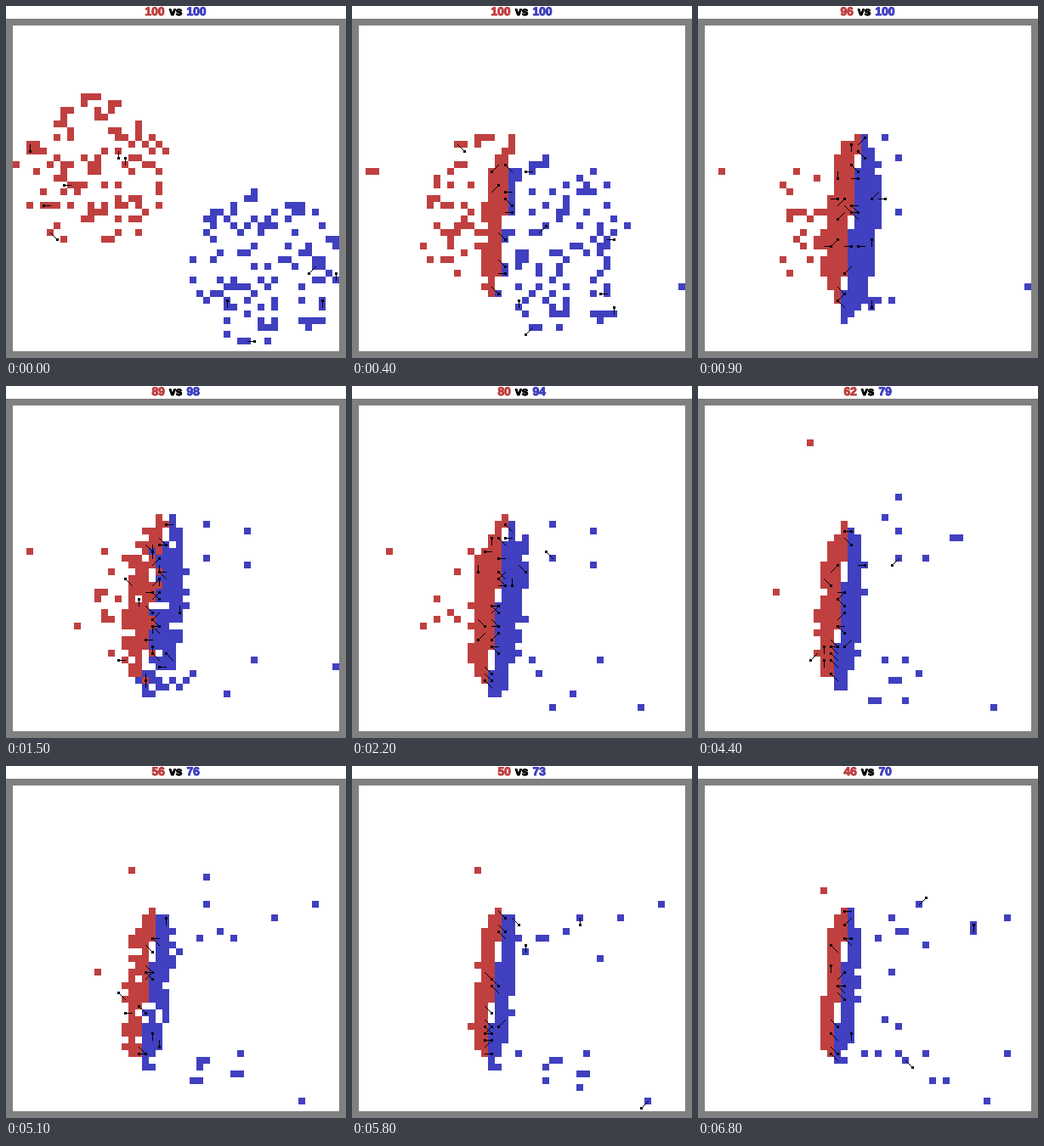
Animation, 400 px wide and 415 px high, one loop 6.9 s. Source, as a matplotlib script:

```python
import numpy as np
import matplotlib.pyplot as plt
from matplotlib import patheffects
from matplotlib.animation import FuncAnimation

W, H, DPI = 400, 415, 80
CELL, SIDE, LEFT, TOP = 8, 48, 8, 23
FRAMES, INTERVAL = 69, 100
RED, BLUE = (192, 64, 64), (64, 64, 192)

TIMES = [0, 9, 22, 34, 44, 58, 68]
SIZES = [(100, 96, 80, 69, 62, 50, 46), (100, 100, 94, 86, 79, 73, 70)]
CAMPS = [(11.6, 21), (36.5, 35.3)]
# One wanderer per team, given as a few waypoints
LONERS = [[(0, 20), (2, 21), (4, 21), (14, 8), (15, 5), (17, 12), (17, 15)],
          [(47, 37), (47, 38), (41, 44), (41, 45), (42, 44), (42, 46), (41, 46)]]

rng = np.random.default_rng(12)
GRID = [(c, r) for r in range(SIDE) for c in range(SIDE)]
NEAR = sorted(((dx, dy) for dx in range(-6, 7) for dy in range(-6, 7)),
              key=lambda d: d[0] ** 2 + d[1] ** 2)
DIRS = [(dx, dy) for dx in (-1, 0, 1) for dy in (-1, 0, 1) if dx or dy]


def inside(c, r):
    return 0 <= c < SIDE and 0 <= r < SIDE


def settle(wanted, taken):
    """Give each wanted cell, or the nearest free one."""
    cells = []
    for c, r in wanted:
        for dx, dy in NEAR:
            p = (int(c + dx), int(r + dy))
            if p not in taken and inside(*p):
                taken.add(p)
                cells.append(p)
                break
    return cells


def best(score, n, taken):
    """The n free cells with the lowest score."""
    ranked = sorted((score(c, r), (c, r)) for c, r in GRID if (c, r) not in taken)
    cells = [cell for _, cell in ranked[:n]]
    taken.update(cells)
    return cells


def camp_score(side):
    cx, cy = CAMPS[side]
    return lambda c, r: np.hypot(c - cx, r - cy) // 11.5 + rng.random()


def line_score(side, t):
    """Depth behind a slanted front, fading at both ends of the line."""
    mid, half = ((28, 12), (30, 12.5))[side]

    def score(c, r):
        edge = 20 - 0.11 * (r - 18) + 1.5 * np.exp((9 - t) / 10)
        depth = c - edge - 1.3 if side else edge - c
        if depth < -0.5:
            return 99
        return depth + 2.5 * ((r - mid) / half) ** 4 + rng.uniform(0, 1.2)
    return score


def strays(side, t):
    """Red latecomers thin out; blue flanks spread to the right."""
    if side == 0:
        n = round(22 * np.exp((9 - t) / 12))
        return np.rint(rng.normal((13.5, 28), (2.5, 4.5), (n, 2)))
    n = round(6 + 0.2 * t)
    cols = np.minimum(23 + rng.exponential(2 + 0.1 * t, n), SIDE - 4)
    rows = np.where(np.arange(n) % 2, rng.normal(20, 3, n), rng.normal(40, 2, n))
    return np.rint(np.column_stack([cols, rows]))


def formations():
    keys = []
    for k, t in enumerate(TIMES):
        taken, pair = set(), []
        for side in (0, 1):
            cells = settle([LONERS[side][k]], taken)
            if k:
                cells += settle(strays(side, t), taken)
            score = line_score(side, t) if k else camp_score(side)
            cells += best(score, SIZES[side][k] - len(cells), taken)
            pair.append(np.array(cells))
        keys.append(pair)
    return keys


def match(a, b):
    """Pair up two sets of cells by swapping until the travel is short."""
    cost = ((a[:, None] - b[None]) ** 2).sum(-1)
    rows = order = np.arange(len(a))
    order = order.copy()
    for _ in range(12):
        for i in rows:
            gain = (cost[i, order[i]] + cost[rows, order]
                    - cost[i, order] - cost[rows, order[i]])
            j = gain.argmax()
            if gain[j] > 0:
                order[i], order[j] = order[j], order[i]
    return order


def plan(a, b, steps, opening):
    """Wanted cells of one team for each step; None marks the fallen."""
    lost = len(a) - len(b)
    ends = np.vstack([b, b[rng.integers(0, len(b), lost)]])
    # The wanderer keeps its place in the list
    order = np.append(0, 1 + match(a[1:], ends[1:]))
    base = 0.5 if opening else 0
    walks = []
    for start, t in zip(a, order):
        move = ends[t] - start
        need = min(steps, max(1, int(np.ceil(np.abs(move).max() / 2))))
        wait = 0 if opening else rng.integers(0, steps - need + 1)
        end = steps + 1
        if t >= len(b):
            end = np.ceil(steps * (base + (1 - base) * (t - len(b) + 1) / lost))
        walks.append([np.rint(start + move * np.clip((s - wait) / need, 0, 1))
                      if s < end else None for s in range(steps + 1)])
    return walks


def battle():
    keys = formations()
    frames = [[[tuple(p) for p in team] for team in keys[0]]]
    for k in range(len(TIMES) - 1):
        steps = TIMES[k + 1] - TIMES[k]
        walks = [plan(keys[k][s], keys[k + 1][s], steps, k == 0) for s in (0, 1)]
        for s in range(1, steps + 1):
            taken = set()
            frames.append([settle([w[s] for w in team if w[s] is not None], taken)
                           for team in walks])
    return frames


def attacks(teams, i):
    """Strikes as (cell, direction), mostly at neighbouring enemies."""
    dice = np.random.default_rng(100 + i)
    hits = []
    for side in (0, 1):
        foes = set(teams[1 - side])
        for c, r in teams[side]:
            reach = [d for d in DIRS if inside(c + d[0], r + d[1])]
            aims = [d for d in reach if (c + d[0], r + d[1]) in foes]
            if dice.random() < (0.35 if aims else 0.08):
                pool = aims or reach
                hits.append(((c, r), pool[dice.integers(len(pool))]))
    return hits


def paint(i):
    img = np.full((H, W, 3), 255, np.uint8)
    img[TOP - CELL:] = 128
    img[TOP:TOP + SIDE * CELL, LEFT:LEFT + SIDE * CELL] = 255
    for team, color in zip(BATTLE[i], (RED, BLUE)):
        for c, r in team:
            y, x = TOP + r * CELL, LEFT + c * CELL
            img[y:y + CELL, x:x + CELL] = color
    for (c, r), (dx, dy) in attacks(BATTLE[i], i):
        x, y = LEFT + c * CELL + 4, TOP + r * CELL + 4
        for k in range(CELL + 1):
            img[y + k * dy, x + k * dx] = 0
        x, y = x + CELL * dx, y + CELL * dy
        img[y - 1:y + 2, x - 1:x + 2] = 0
    return img


BATTLE = battle()
fig = plt.figure(figsize=(W / DPI, H / DPI), dpi=DPI)
ax = fig.add_axes([0, 0, 1, 1])
ax.axis("off")
field = ax.imshow(paint(0), extent=(0, W, H, 0), aspect="auto", interpolation="nearest")


def label(color):
    rgb = np.array(color) / 255
    return ax.text(0, 11, "", color=rgb, family="Liberation Sans", weight="bold",
                   size=12.4, va="baseline",
                   path_effects=[patheffects.withStroke(linewidth=0.9, foreground=rgb)])


labels = [label(c) for c in (RED, (0, 0, 0), BLUE)]


def update(i):
    field.set_data(paint(i))
    red, blue = (str(len(team)) for team in BATTLE[i])
    x = W / 2 - (CELL * len(red + "vs" + blue) + 9) / 2
    for text, word in zip(labels, (red, "vs", blue)):
        text.set_text(word)
        text.set_x(x)
        x += CELL * len(word) + 4.5
    return [field, *labels]


anim = FuncAnimation(fig, update, frames=FRAMES, interval=INTERVAL,
                     repeat=True, repeat_delay=0, blit=False)
plt.show()
```
